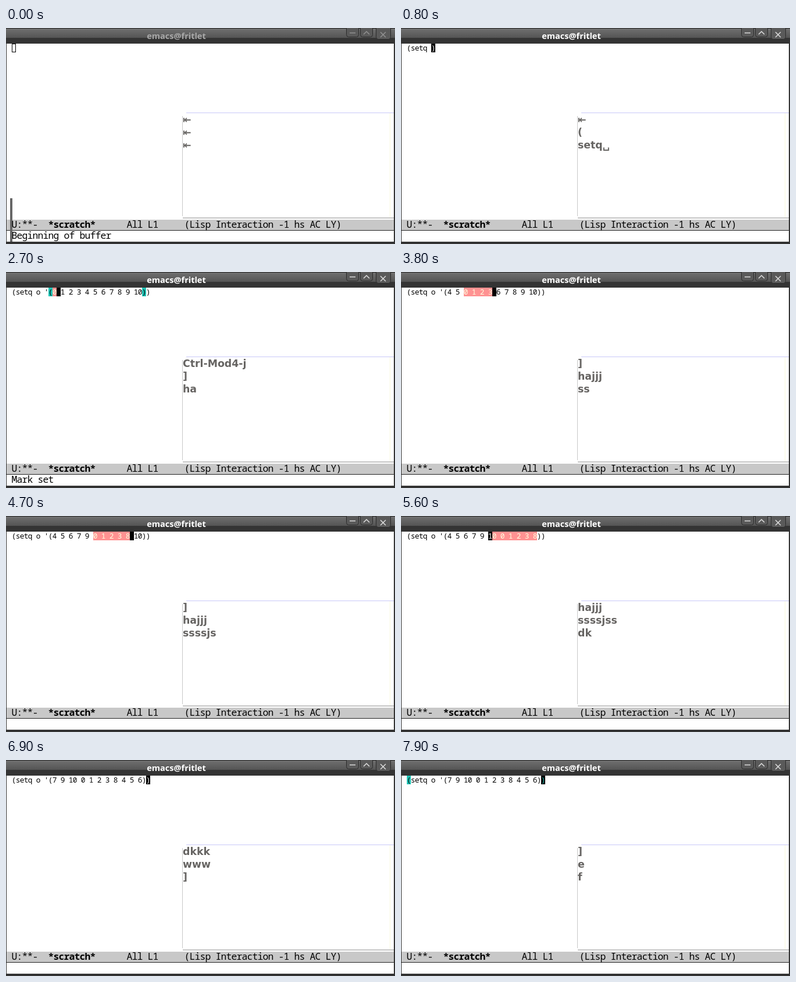
Animation of 669x373 px, one loop 8000 ms. Source, as an HTML page with a canvas:

```html
<!DOCTYPE html>
<html lang="en">
<head>
<meta charset="utf-8">
<title>Editor session</title>
<style>
html, body { margin: 0; width: 100%; height: 100%; overflow: hidden; background: #fff; }
canvas { display: block; }
</style>
</head>
<body>
<canvas id="stage" width="669" height="373"></canvas>
<script>
const ctx = document.getElementById('stage').getContext('2d');
const LOOP = 8000, LEFT = 10, CELL = 7, BIG_CELL = 9;
const MONO = '"Noto Sans Mono", "DejaVu Sans Mono", monospace';
const SMALL = `500 12.8px ${MONO}`, BIG = `500 16.4px ${MONO}`, BIG_BOLD = `bold 16.4px ${MONO}`;
const HEAD = "(setq o '(";

// Lines of the key display: start time, delay per key (0 = one chord), keys
const lines = [
  [0, 0, '⇤'], [0, 0, '⇤'], [0, 0, '⇤'],
  [200, 0, '('], [400, 100, 'setq␣o␣'], [1100, 0, "'"], [1200, 0, '('], [1300, 100, 'm10'],
  [1800, 0, 'Ctrl-Mod4-j'], [2100, 0, ']'], [2400, 250, 'hajjj'],
  [3550, 210, 'ssssjss'], [5250, 300, 'dkkk'], [6300, 160, 'www'],
  [6850, 0, ']'], [7400, 0, 'e'], [7800, 0, 'f']
];
const events = lines.slice(3).flatMap(([start, step, keys]) =>
  step ? [...keys].map((key, i) => [start + i * step, key]) : [[start, keys]]);

function rect(color, x, y, w, h) {
  ctx.fillStyle = color;
  ctx.fillRect(x, y, w, h);
}

function text(str, x, y, font, color = '#000', align = 'left') {
  ctx.font = font;
  ctx.fillStyle = color;
  ctx.textAlign = align;
  ctx.fillText(str, x, y);
}

// Text on a character grid
function grid(str, col, y, cell, font, color) {
  [...str].forEach((ch, i) => text(ch, LEFT + (col + i + .5) * cell, y, font, color, 'center'));
}

function stroke(color, width, ...points) {
  ctx.strokeStyle = color;
  ctx.lineWidth = width;
  ctx.beginPath();
  points.forEach(([x, y]) => ctx.lineTo(x, y));
  ctx.stroke();
}

// Replays the keys up to time t and returns the state of the buffer
function replay(t) {
  let before = '', after = '', items = null, lo = -1, hi = -1, atStart = false, hints = false;
  let point = 0;
  const move = (from, to) => items.splice(to, 0, items.splice(from, 1)[0]);
  const commands = {
    'Ctrl-Mod4-j': () => { items = [...Array(11).keys()]; point = 32; },
    ']': () => { lo = hi = -1; point = 33; },
    h: () => { hints = true; },
    a: () => { hints = false; lo = hi = 0; },
    j: () => { hi++; },
    k: () => { lo--; },
    d: () => { atStart = !atStart; },
    s: () => { move(hi + 1, lo); lo++; hi++; },
    w: () => { move(lo - 1, hi); lo--; hi--; }
  };
  for (const [time, key] of events) {
    if (time > t) break;
    if (time < 1800) {
      before += key === '␣' ? ' ' : key;
      if (key === '(') after += ')';
      point = before.length;
    } else if (commands[key]) commands[key]();
  }
  if (!items) return { str: before + after, point, from: 0, to: 0 };
  const end = n => HEAD.length + items.slice(0, n).join(' ').length;
  let from = 0, to = 0;
  if (lo >= 0) {
    from = end(lo) + (lo ? 1 : 0);
    to = end(hi + 1);
    point = atStart ? from : to;
  }
  return { str: HEAD + items.join(' ') + '))', items, point, from, to, hints };
}

function parenCells(t) {
  if (t >= 7800) return [0];
  return (t >= 2250 && t < 2800) || (t >= 7000 && t < 7400) ? [9, 32] : [];
}

function drawBuffer(t, { str, items, point, from, to, hints }) {
  const parens = parenCells(t);
  const cursorOn = t < 1550 || t >= 1800;
  for (let i = 0; i <= str.length; i++) {
    let color = '#000', back = '';
    if (hints && i >= HEAD.length) color = '#888';
    if (i >= from && i < to) [back, color] = ['#ff9292', '#ffffe0'];
    if (parens.includes(i)) back = '#20c4b6';
    if (i === point && cursorOn && t >= 100) {
      back = '#000';
      color = t >= 7800 ? '#20c4b6' : '#fff';
    }
    if (back) rect(back, LEFT + i * CELL, 27, CELL, 15);
    grid(str[i] || ' ', i, 39, CELL, SMALL, color);
  }
  if (hints) {
    let col = HEAD.length;
    items.forEach((item, i) => {
      rect('#fff', LEFT + col * CELL, 27, CELL, 15);
      grid('abcdefghijk'[i], col, 39, CELL, SMALL, '#e00');
      col += String(item).length + 1;
    });
  }
  if (t < 100) {
    ctx.strokeStyle = '#000';
    ctx.lineWidth = 1;
    ctx.strokeRect(LEFT + .5, 27.5, 6, 14);
  }
}

function drawButton(x, w, h, icon, color) {
  ctx.beginPath();
  ctx.roundRect(x + .5, -3.5, w, h + 3, [0, 0, 4, 4]);
  ctx.fillStyle = '#5a5a5a';
  ctx.fill();
  ctx.strokeStyle = '#2a2a2a';
  ctx.lineWidth = 1;
  ctx.stroke();
  icon.forEach(points => stroke(color, 1.5, ...points));
}

function drawWindow(focused) {
  rect('#fff', 0, 0, 669, 373);
  const bar = ctx.createLinearGradient(0, 1, 0, 17);
  bar.addColorStop(0, '#707070');
  bar.addColorStop(1, '#545454');
  rect('#222', 0, 0, 669, 1);
  rect(bar, 0, 1, 669, 16);
  rect('#343434', 0, 17, 669, 10);
  const ink = focused ? '#dedede' : '#929292';
  drawButton(585, 21, 16, [[[591, 8.5], [601, 8.5]]], ink);
  drawButton(609, 21, 16, [[[615, 11], [620, 6], [625, 11]]], ink);
  drawButton(636, 25, 20, [[[644, 7], [653, 16]], [[653, 7], [644, 16]]], ink);
  text('emacs@fritlet', 293, 19, 'bold 14.5px "Open Sans", "Noto Sans", sans-serif',
    focused ? '#fff' : '#a8a8a8', 'center');
  rect('#333', 0, 27, 1, 346);
  rect('#333', 667, 27, 2, 346);
  rect('#c8c8c8', 1, 331, 666, 18);
  rect('#222', 1, 349, 666, 1);
  rect('#333', 0, 369, 669, 4);
}

function drawStatus(t, items) {
  grid('U:**-', 0, 345, BIG_CELL, BIG);
  grid('*scratch*', 7, 345, BIG_CELL, BIG_BOLD);
  grid('All L1', 22, 345, BIG_CELL, BIG);
  grid('(Lisp Interaction -1 hs AC LY)', 33, 345, BIG_CELL, BIG);
  let echo = '';
  if (t < 200) echo = 'Beginning of buffer';
  else if (t >= 2650 && t < 2900) echo = 'Mark set';
  else if (t >= 7400 && t < 7800) echo = `(${items.join(' ')})`;
  grid(echo, 0, 364, BIG_CELL, BIG);
}

function drawKeys(t) {
  rect('#fff', 304, 147, 363, 181);
  stroke('#c8c8f8', 1, [310, 146.5], [667, 146.5]);
  stroke('#c8c8c8', 1, [303.5, 152], [303.5, 325]);
  stroke('#c4c4c4', 2, [304, 328], [667, 328]);
  stroke('#fafadc', 1, [660.5, 147], [660.5, 327]);
  lines.filter(([start]) => start <= t).slice(-3).forEach(([start, step, keys], row) => {
    const shown = step ? keys.slice(0, Math.floor((t - start) / step) + 1) : keys;
    text(shown, 304, 164 + row * 22, 'bold 17.33px "DejaVu Sans", sans-serif', '#666462');
  });
}

function frame(now) {
  const t = now % LOOP;
  const state = replay(t);
  drawWindow(t >= 100);
  drawBuffer(t, state);
  drawKeys(t);
  if (t < 100) rect('#666', 7, 294, 4, 75);
  drawStatus(t, state.items);
  requestAnimationFrame(frame);
}
requestAnimationFrame(frame);
</script>
</body>
</html>
```
